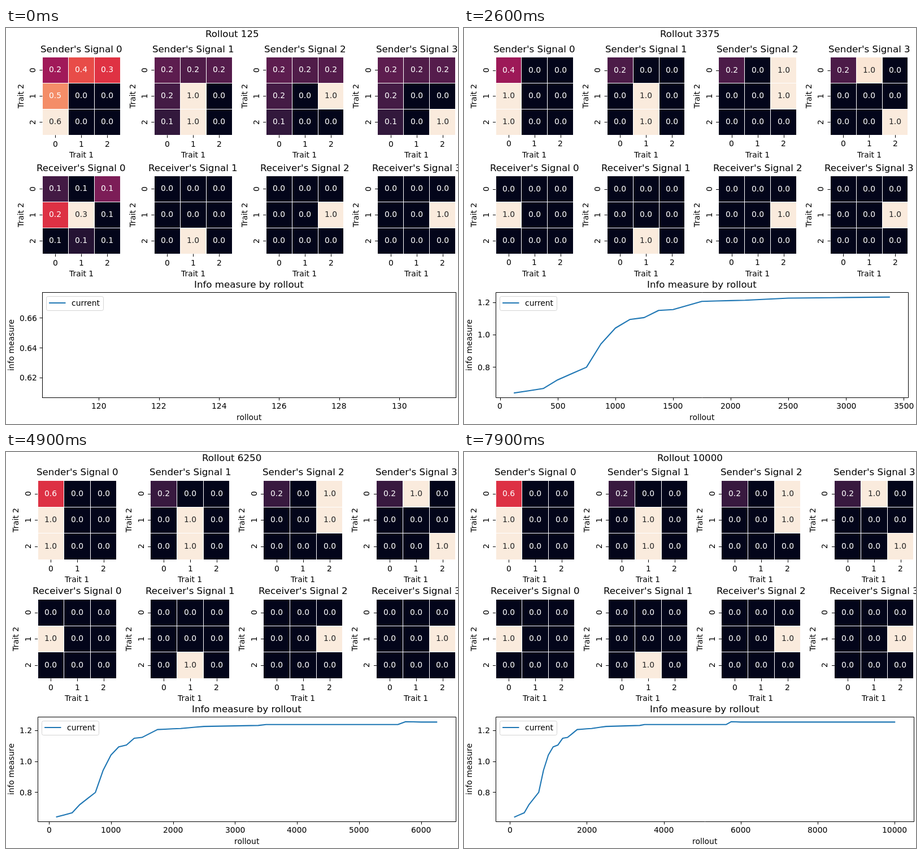
An HTML page with a canvas that plays this animation: 800x700 px, repeating every 8000 ms.

```html
<!DOCTYPE html>
<html lang="en">
<head>
<meta charset="utf-8">
<title>Signals by rollout</title>
<style>
html, body { margin: 0; width: 100%; height: 100%; overflow: hidden; background: #fff; }
canvas { display: block; }
</style>
</head>
<body>
<canvas id="stage" width="800" height="700"></canvas>
<script>
const ctx = document.getElementById('stage').getContext('2d');
const STEPS = 80, STEP_MS = 100, STRIDE = 125;
const SMALL = 13.89, LARGE = 16.67, BLUE = '#1f77b4';
const RIGHT = 795.83, BOTTOM = 653.5, GAP = 60;
const ROW_CENTERS = [120.4, 330.4];

// Bends of the learning curve: step, info measure.
const bends = [[1, .642], [3, .669], [4, .7225], [6, .8005], [7, .944], [8, 1.0415],
  [9, 1.0945], [10, 1.1065], [11, 1.1505], [12, 1.1555], [14, 1.2065], [17, 1.2135],
  [20, 1.2265], [27, 1.233], [28, 1.239], [45, 1.239], [46, 1.257], [48, 1.255], [80, 1.255]];

const rocket = ['#03051a', '#35193e', '#701f57', '#ad1759', '#e13342', '#f37651', '#f6b48f', '#faebdd']
  .map(h => [1, 3, 5].map(i => parseInt(h.slice(i, i + 2), 16)));

const owners = [null, 3, 2, 0, 1, 2, 0, 1, 3];
const answers = [3, 7, 5, 5];
const hunches = [4, 3, 2, 0, 7];

const mix = (a, b, k) => a + (b - a) * k;
const clamp = (v, lo, hi) => Math.min(hi, Math.max(lo, v));
const floorPx = v => Math.floor(v) + .5;
const roundPx = v => Math.round(v) + .5;

function info(n) {
  const i = Math.max(1, bends.findIndex(b => b[0] >= n));
  const [[n0, v0], [n1, v1]] = [bends[i - 1], bends[i]];
  return mix(v0, v1, (n - n0) / (n1 - n0));
}

// Signal 0 leads at first, then every cell settles on its owner.
function senderShare(s, c, level) {
  const row = Math.floor(c / 3), col = c % 3;
  if (c === 0) {
    const gain = clamp((level - 1.2135) * 7.8, 0, .32);
    return .24 + (s ? -.28 * gain : gain);
  }
  const goal = owners[c] === s ? 1 : 0;
  if (row && col) return goal;
  const lead = row ? .32 + .14 * row : .41 - .035 * col;
  const u = (level - .642) / .4;
  const k = clamp(row ? u : col === 2 ? .9 * u : .45 * u * u, 0, 1);
  if (s === 0 && !goal) return lead * (1 - k) ** 2;
  return mix(s ? (1 - lead) / 3 : lead, goal, k);
}

function receiverShare(s, c, n) {
  const rank = hunches.indexOf(c);
  const guess = .065 + (rank < 0 ? 0 : .195 * .56 ** rank);
  return mix(guess, c === answers[s] ? 1 : 0, s ? 1 : Math.min(1, (n - 1) / 4));
}

const grid = share => Array.from({ length: 9 }, (_, c) => share(c));

function shade(v) {
  const p = clamp(v, 0, 1) * (rocket.length - 1);
  const i = Math.min(rocket.length - 2, Math.floor(p));
  return rocket[i].map((c, j) => Math.round(mix(c, rocket[i + 1][j], p - i)));
}

function luminance(rgb) {
  const [r, g, b] = rgb.map(c => {
    c /= 255;
    return c <= .03928 ? c / 12.92 : ((c + .055) / 1.055) ** 2.4;
  });
  return .2126 * r + .7152 * g + .0722 * b;
}

function textWidth(str, size = SMALL) {
  ctx.font = size + 'px "DejaVu Sans", sans-serif';
  return ctx.measureText(str).width;
}

// Text starts on a whole pixel; anchor is 0 left, .5 centre, 1 right.
function text(str, x, y, { size = SMALL, anchor = .5, color = '#000' } = {}) {
  const w = textWidth(str, size);
  ctx.fillStyle = color;
  ctx.fillText(str, Math.round(x - w * anchor), Math.round(y));
}

function upText(str, x, y) {
  ctx.save();
  ctx.translate(Math.round(x), Math.round(y + textWidth(str) / 2));
  ctx.rotate(-Math.PI / 2);
  text(str, 0, 0, { anchor: 0 });
  ctx.restore();
}

function line(x1, y1, x2, y2, color = '#000', width = 1) {
  ctx.strokeStyle = color;
  ctx.lineWidth = width;
  ctx.beginPath();
  ctx.moveTo(x1, y1);
  ctx.lineTo(x2, y2);
  ctx.stroke();
}

function ticks(lo, hi, bins) {
  const raw = (hi - lo) / bins;
  const unit = 10 ** Math.floor(Math.log10(raw));
  const step = [1, 2, 2.5, 5, 10].find(m => m * unit >= raw * (1 - 1e-9)) * unit;
  const digits = (String(+step.toPrecision(3)).split('.')[1] || '').length;
  const marks = [];
  for (let i = Math.ceil(lo / step - 1e-9); i * step <= hi + step * 1e-9; i++) {
    marks.push({ value: i * step, label: (i * step).toFixed(digits) });
  }
  return { marks, digits };
}

function limits(lo, hi) {
  if (lo === hi) [lo, hi] = [lo * .95, hi * 1.05];
  const pad = (hi - lo) * .05;
  return [lo - pad, hi + pad];
}

// Tick labels decide the margins that all panels share.
function layout(n) {
  const values = Array.from({ length: n }, (_, i) => info(i + 1));
  const [x0, x1] = limits(STRIDE, STRIDE * n);
  const [y0, y1] = limits(Math.min(...values), Math.max(...values));
  const xt = ticks(x0, x1, 9), yt = ticks(y0, y1, 6);
  const left = 56.02 + 8.35 * (yt.digits - 1);
  const last = xt.marks[xt.marks.length - 1];
  const inset = (x1 - last.value) / (x1 - x0) * (RIGHT - left);
  const right = RIGHT - Math.max(0, textWidth(last.label) / 2 - inset);
  const side = (right - left - 3 * GAP) / 4;
  const top = 468.4 + (side - 140) * .5;
  return { values, x0, x1, y0, y1, xt, yt, left, right, side, top };
}

function heatmap(title, cells, x, cy, side) {
  const top = cy - side / 2, bottom = cy + side / 2, cell = side / 3;
  const lo = Math.min(...cells), hi = Math.max(...cells);
  cells.forEach((v, i) => {
    const cx = x + (i % 3) * cell, y = top + Math.floor(i / 3) * cell;
    const rgb = shade((v - lo) / (hi - lo));
    const l = Math.floor(cx), t = Math.floor(y);
    ctx.fillStyle = `rgb(${rgb})`;
    ctx.fillRect(l, t, Math.floor(cx + cell) - l, Math.floor(y + cell) - t);
    text(v.toFixed(1), cx + cell / 2, y + cell / 2 + 4,
      { color: luminance(rgb) > .408 ? '#262626' : '#fff' });
  });
  for (let i = 0; i < 4; i++) {
    const gx = floorPx(x + i * cell), gy = floorPx(top + i * cell);
    line(gx, top - 1, gx, bottom, '#fff');
    line(x - 1, gy, x + side, gy, '#fff');
  }
  for (let i = 0; i < 3; i++) {
    const mx = x + (i + .5) * cell, my = top + (i + .5) * cell;
    line(roundPx(mx), bottom, roundPx(mx), bottom + 4.9);
    line(x - 4.9, roundPx(my), x, roundPx(my));
    text(i, mx, bottom + 20.3);
    upText(i, x - 12.4, my);
  }
  text(title, x + side / 2, top - 8.95, { size: LARGE });
  text('Trait 1', x + side / 2, bottom + 39.6);
  upText('Trait 2', x - 33.6, cy);
}

function legend(left, top) {
  const x = floorPx(left) + 7, y = floorPx(top) + 7;
  ctx.beginPath();
  ctx.roundRect(x, y, 101, 25, 2.8);
  ctx.fillStyle = 'rgba(255,255,255,.8)';
  ctx.fill();
  ctx.strokeStyle = '#d4d4d4';
  ctx.lineWidth = 1;
  ctx.stroke();
  line(x + 4.6, y + 11.5, x + 34, y + 11.5, BLUE, 2);
  text('current', x + 44.5, y + 16.5, { anchor: 0 });
}

function chart(g) {
  const { left, right, top } = g, mid = (left + right) / 2;
  const px = v => left + (v - g.x0) / (g.x1 - g.x0) * (right - left);
  const py = v => BOTTOM - (v - g.y0) / (g.y1 - g.y0) * (BOTTOM - top);

  if (g.values.length > 1) {
    ctx.beginPath();
    g.values.forEach((v, i) => ctx.lineTo(px(STRIDE * (i + 1)), py(v)));
    ctx.strokeStyle = BLUE;
    ctx.lineWidth = 2.08;
    ctx.lineJoin = 'round';
    ctx.lineCap = 'square';
    ctx.stroke();
    ctx.lineCap = 'butt';
  }
  for (const { value, label } of g.xt.marks) {
    const x = px(value);
    line(roundPx(x), BOTTOM, roundPx(x), BOTTOM + 4.9);
    text(label, x, 673);
  }
  for (const { value, label } of g.yt.marks) {
    const y = py(value);
    line(left - 4.9, floorPx(y), left, floorPx(y));
    text(label, left - 9.7, y + 5, { anchor: 1 });
  }
  const l = floorPx(left), t = floorPx(top);
  ctx.strokeStyle = '#000';
  ctx.lineWidth = 1;
  ctx.strokeRect(l, t, roundPx(right) - l, BOTTOM - t);
  legend(left, top);
  text('Info measure by rollout', mid, top - 8.33, { size: LARGE });
  text('rollout', mid, 693);
  upText('info measure', 14, (top + BOTTOM) / 2);
}

function draw(n) {
  ctx.fillStyle = '#fff';
  ctx.fillRect(0, 0, 800, 700);
  const g = layout(n), level = info(n);
  text('Rollout ' + STRIDE * n, 400, 16, { size: LARGE });
  for (let s = 0; s < 4; s++) {
    const x = g.left + s * (g.side + GAP);
    heatmap("Sender's Signal " + s, grid(c => senderShare(s, c, level)), x, ROW_CENTERS[0], g.side);
    heatmap("Receiver's Signal " + s, grid(c => receiverShare(s, c, n)), x, ROW_CENTERS[1], g.side);
  }
  chart(g);
}

const start = performance.now();
let shown = 0;
function tick() {
  const t = Math.max(0, performance.now() - start);
  const n = Math.floor(t / STEP_MS) % STEPS + 1;
  if (n !== shown) draw(shown = n);
  requestAnimationFrame(tick);
}
tick();
</script>
</body>
</html>
```
